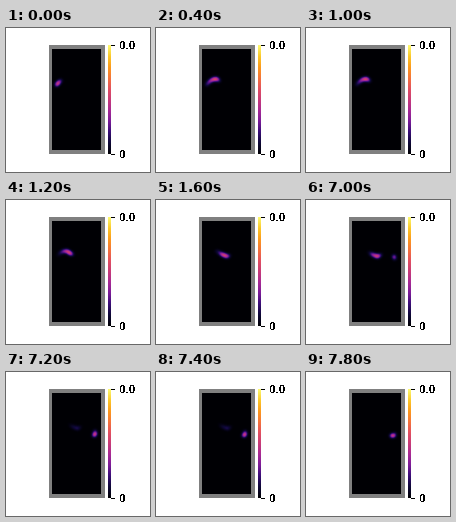
Recreate the animation shown at these times as a matplotlib script. Size 144x144 px, loop 8000 ms.

```python
import numpy as np
import matplotlib.pyplot as plt
from matplotlib.animation import FuncAnimation
from matplotlib.colors import LinearSegmentedColormap
from matplotlib.patches import Rectangle

SIZE, DPI = 144, 100
STEP, LOOP = 200, 8000
LEFT, RIGHT, TOP, BOTTOM = 46, 95, 21, 122
SIGMA, GAIN = 1.65, 0.16

heat = LinearSegmentedColormap.from_list("heat", [
    "#000004", "#0e0838", "#3a0e78", "#7c1c98", "#a82a94", "#c83c78",
    "#e25060", "#f4743c", "#fc9a1c", "#fbc82a", "#fcf870"])

# Two strokes of the moving spot
SWEEP = np.array([(50.5, 57), (53.5, 53.5), (57, 51.3), (61, 51), (64.5, 53.5),
                  (67.5, 55), (71.5, 56.5), (75.5, 54.5), (79, 53.3)])
HOOK = np.array([(88, 56.5), (89.5, 60.5), (88.3, 63.5), (85, 63.8)])

gx, gy = np.meshgrid(np.arange(LEFT, RIGHT) + 0.5, np.arange(TOP, BOTTOM) + 0.5)


def stroke(path, head, trail, lead):
    """Glow along a path, strongest at head and fading both ways."""
    u = np.linspace(0, len(path) - 1, 4 * len(path) - 3)
    d = head - u
    weight = np.clip(1 - np.where(d > 0, d / trail, -d / lead), 0, 1) ** 1.5
    x, y = (np.interp(u, np.arange(len(path)), c) for c in path.T)
    r2 = (gx[..., None] - x) ** 2 + (gy[..., None] - y) ** 2
    return GAIN * np.exp(-r2 / (2 * SIGMA ** 2)) @ weight


def field(t):
    total = np.zeros_like(gx)
    if t < 7.6:
        head = np.interp(t, [0, 0.2, 1, 1.2, 1.6, 2], [0.6, 2.8, 2.9, 3.8, 5.6, 6])
        trail = np.interp(t, [0.2, 2], [5, 3])
        total += stroke(SWEEP, head, trail, 1.3) * (1 if t < 7.2 else 0.25)
    if t >= 7:
        head = np.interp(t, [7, 7.2, 7.6, 7.8], [0, 1.7, 2, 2.6])
        total += stroke(HOOK, head, 1.6, 0.9)
    return total


plt.rcParams["text.antialiased"] = False
fig = plt.figure(figsize=(SIZE / DPI, SIZE / DPI), dpi=DPI, facecolor="white")
ax = fig.add_axes([0, 0, 1, 1])
ax.axis("off")


def box(x, y, w, h, color):
    ax.add_patch(Rectangle((x, y), w, h, fc=color, lw=0, antialiased=False))


def heatmap(data, extent):
    return ax.imshow(data, cmap=heat, vmin=0, vmax=1, extent=extent,
                     interpolation="nearest", zorder=2)


box(43, 17, 56, 109, "#808080")
image = heatmap(field(0), (LEFT, RIGHT, BOTTOM, TOP))
heatmap(np.linspace(1, 0, 109)[:, None], (102, 105, 126, 17))
for y, label in ((17, "0.0"), (126, "0")):
    box(105, y - 0.5, 4, 1, "black")
    ax.text(113, y + 4, label, family="Liberation Sans", weight="bold",
            size=11.5 * 72 / DPI, va="baseline", ha="left", color="black")

ax.set_xlim(0, SIZE)
ax.set_ylim(SIZE, 0)
ax.set_aspect("auto")


def update(i):
    image.set_data(field(i * STEP / 1000 + 1e-6))
    return [image]


anim = FuncAnimation(fig, update, frames=LOOP // STEP, interval=STEP,
                     repeat=True, repeat_delay=0, blit=False)
plt.show()
```
